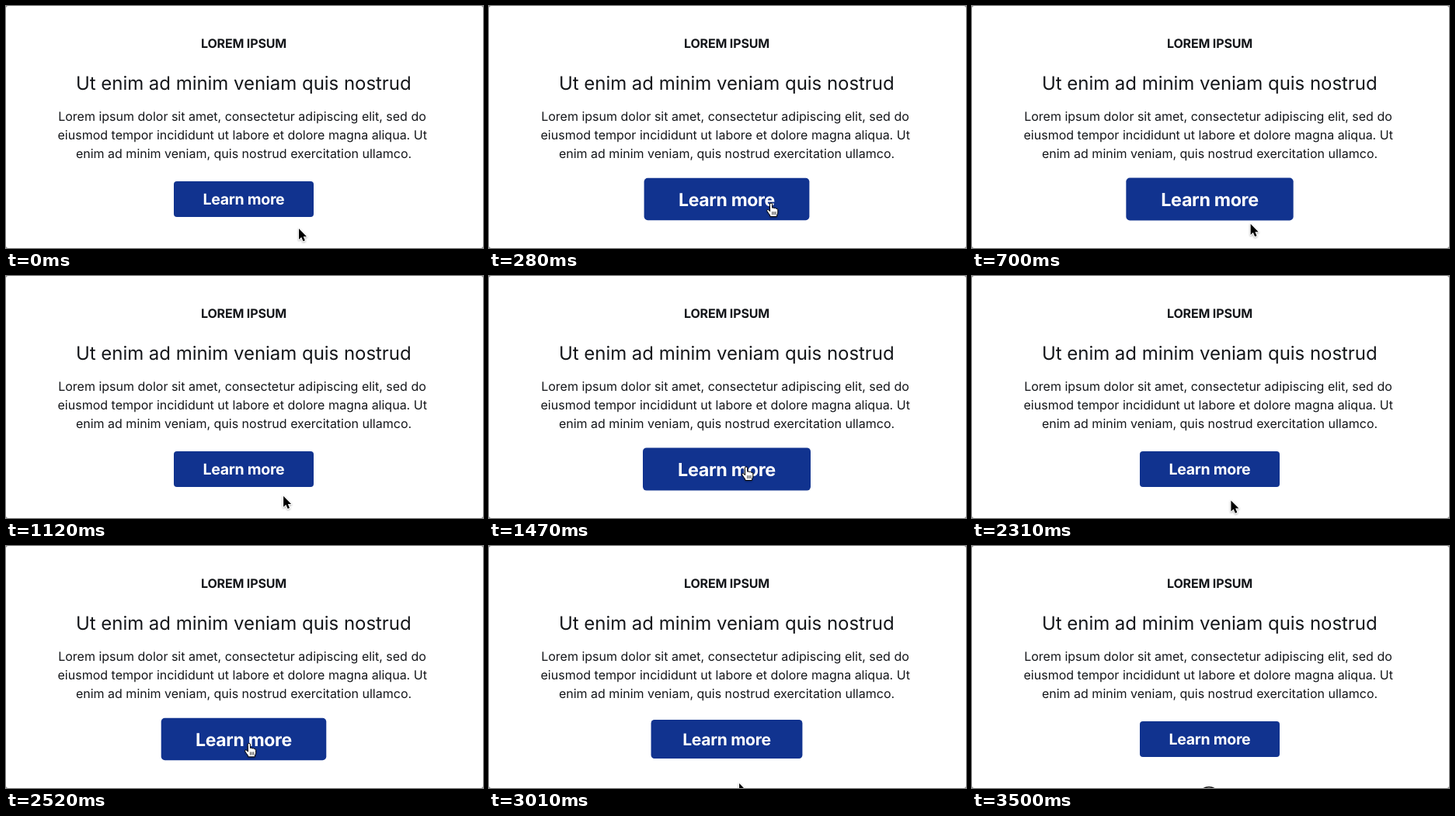
Animation, 614 px wide and 312 px high, one loop 3570 ms. Source, as an HTML page:

```html
<!DOCTYPE html>
<html lang="en">
<head>
<meta charset="utf-8">
<title>Button hover</title>
<style>
  html, body { margin: 0; width: 100%; height: 100%; overflow: hidden; background: #858585; }
  svg { display: block; width: 614px; height: 312px; }
  text {
    font-family: Inter, "Noto Sans", sans-serif;
    font-optical-sizing: none;
    text-anchor: middle;
    text-rendering: geometricPrecision;
    fill: #14161a;
  }
  .eyebrow { font-size: 16px; font-weight: 700; letter-spacing: -.16px; }
  .title { font-size: 24px; letter-spacing: -.04px; }
  .copy { font-size: 16px; }
  .label { font-size: 19.5px; font-weight: 700; letter-spacing: -.3px; fill: #fff; }
  #cursor { filter: drop-shadow(0 1px 1px rgba(0, 0, 0, .3)); }
</style>
</head>
<body>
<svg viewBox="0 0 614 312">
  <rect width="614" height="312" rx="3" fill="#fff"/>
  <text class="eyebrow" x="306" y="53.6">LOREM IPSUM</text>
  <text class="title" x="305.8" y="107.8">Ut enim ad minim veniam quis nostrud</text>
  <g class="copy">
    <text x="304" y="148">Lorem ipsum dolor sit amet, consectetur adipiscing elit, sed do</text>
    <text x="304.2" y="172">eiusmod tempor incididunt ut labore et dolore magna aliqua. Ut</text>
    <text x="306" y="196">enim ad minim veniam, quis nostrud exercitation ullamco.</text>
  </g>
  <g id="button">
    <rect x="-90" y="-23" width="180" height="46" rx="4" fill="#11338f"/>
    <text class="label" y="7.3">Learn more</text>
  </g>
  <circle id="ring" cx="305" cy="325" r="14.2" fill="#fff" stroke="#111" stroke-width="1.6"/>
  <g id="cursor">
    <path id="arrow" d="M0 0V14L3.2 11L5.5 16.3L7.9 15.3L5.7 10.2H10Z"
          fill="#000" stroke="#fff" stroke-width="2" paint-order="stroke" stroke-linejoin="round"/>
    <g id="hand" stroke="#000" stroke-linecap="round" stroke-linejoin="round">
      <path fill="#fff" d="M-1.6 1.6a1.6 1.6 0 0 1 3.2 0V6.2q1.5-.8 2.6.4q1.6-.6 2.4.6q2-.3 2.2 1.6V12q0 2-1.2 3.6V17.5H-1.2V16C-2.5 14-4 12.5-5 10.6C-6 8.8-4 7.8-2.8 9.2L-1.6 10.5Z"/>
      <path fill="none" stroke-width=".8" d="M1.8 11.5v3.3M3.9 11.5v3.3M6 11.5v3.3"/>
    </g>
  </g>
</svg>
<script>
const LOOP = 3570, STEP = 70, FADE = 300;

// Each move glides the pointer to (x, y) and crosses the button edge at `cross`.
const moves = [
  { from: 0, to: 210, cross: 88, x: 363, y: 254 },
  { from: 530, to: 780, cross: 690, x: 358, y: 285 },
  { from: 1050, to: 1400, cross: 1165, x: 331, y: 246 },
  { from: 1610, to: 1800, cross: 1697, x: 342, y: 304 },
  { from: 2090, to: 2620, cross: 2331, x: 312, y: 253 },
  { from: 2740, to: 3150, cross: 2908, x: 324, y: 316 }
];

const el = id => document.getElementById(id);
const button = el('button'), ring = el('ring'), cursor = el('cursor');
const arrow = el('arrow'), hand = el('hand');
const show = (node, on) => node.setAttribute('visibility', on ? 'visible' : 'hidden');
const clamp = v => Math.min(1, Math.max(0, v));
const glide = p => p < .5 ? 4 * p ** 3 : 1 - 4 * (1 - p) ** 3;
const bezier = (a, b, s) => 3 * a * s * (1 - s) ** 2 + 3 * b * s * s * (1 - s) + s ** 3;

// CSS "ease" timing curve
function ease(p) {
  let lo = 0, hi = 1;
  for (let i = 0; i < 24; i++) {
    const mid = (lo + hi) / 2;
    if (bezier(.25, .25, mid) < p) lo = mid; else hi = mid;
  }
  return bezier(.1, 1, lo);
}

function render(time) {
  const t = Math.floor((time % LOOP) / STEP) * STEP;
  let x = 377, y = 287, grow = 0, over = false;
  moves.forEach((m, i) => {
    const p = glide(clamp((t - m.from) / (m.to - m.from)));
    x += (m.x - x) * p;
    y += (m.y - y) * p;
    grow += (i % 2 ? -1 : 1) * ease(clamp((t - m.cross) / FADE));
    if (t >= m.cross) over = !over;
  });
  button.setAttribute('transform', `translate(306 249) scale(${1 + .2 * grow})`);
  cursor.setAttribute('transform', `translate(${x} ${y})`);
  show(hand, over);
  show(arrow, !over);
  show(cursor, t < moves[5].to);
  if (t >= moves[5].to) show(arrow, false);
  show(ring, t >= 3500);
}

const start = performance.now();
function tick() {
  render(performance.now() - start);
  requestAnimationFrame(tick);
}
tick();
</script>
</body>
</html>
```
